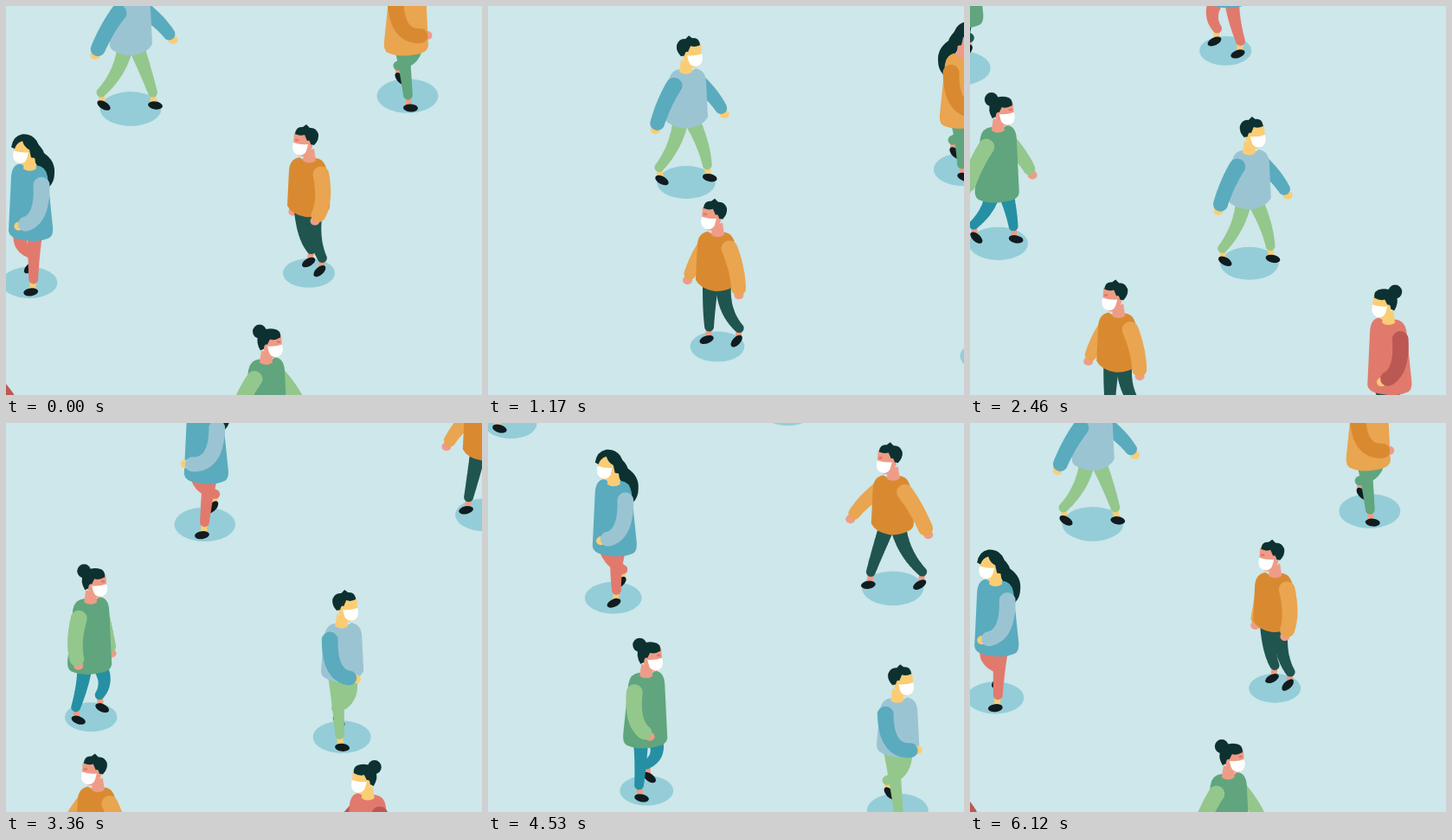
An HTML page with a canvas for the animation above (6.15 s loop, 550x450 px).

```html
<!DOCTYPE html>
<html lang="en">
<head>
<meta charset="utf-8">
<title>Walking people</title>
<style>
html, body { margin: 0; width: 100%; height: 100%; overflow: hidden; background: #cde7ea; }
canvas { display: block; }
</style>
</head>
<body>
<canvas id="stage" width="550" height="450"></canvas>
<script>
const ctx = document.getElementById('stage').getContext('2d');
const LOOP = 6150, STRIDE = 1290, TRAVEL = 447, TICK = 30;
const HAIR = '#0d3130', SHOE = '#101c20', SHADOW = '#94cdd8', MASK = '#ffffff';
const YELLOW = '#facd75', PINK = '#ee9c87';
const SKY = '#9bc4d3', TEAL = '#5aabbe', LEAF = '#94c78c', FERN = '#60a57d';
const OCHRE = '#d98a30', AMBER = '#e9a54f', CORAL = '#e17a6d', BRICK = '#bb5854';
const PINE = '#20544f', OCEAN = '#2590a3';

// dir: 1 walks right, -1 walks left; wide: part of the stride with the legs apart
const people = [
  { x: 167, y: -107, dir: -1, wide: .4, hair: 'bun', skin: PINK, top: FERN, sleeve: LEAF, legs: PINE },
  { x: 464, y: 104, dir: 1, wide: .49, hair: 'long', skin: PINK, top: AMBER, sleeve: OCHRE, legs: FERN },
  { x: 144, y: 119, dir: 1, wide: 0, hair: 'short', skin: YELLOW, top: SKY, sleeve: TEAL, legs: LEAF },
  { x: 27, y: 320, dir: -1, wide: .365, hair: 'long', skin: YELLOW, top: TEAL, sleeve: SKY, legs: CORAL },
  { x: 350, y: 309, dir: -1, wide: .74, hair: 'short', skin: PINK, top: OCHRE, sleeve: AMBER, legs: PINE },
  { x: 662, y: 320, dir: -1, wide: .57, hair: 'bun', skin: YELLOW, top: CORAL, sleeve: BRICK, legs: PINE },
  { x: 301, y: 543, dir: 1, wide: .06, hair: 'bun', skin: PINK, top: FERN, sleeve: LEAF, legs: OCEAN },
  { x: -41, y: 540, dir: 1, wide: 0, hair: 'short', skin: PINK, top: CORAL, sleeve: BRICK, legs: PINE }
];

function shape(d, color) {
  ctx.fillStyle = color;
  ctx.fill(new Path2D(d));
}

function oval(x, y, rx, ry, color, turn = 0) {
  ctx.fillStyle = color;
  ctx.beginPath();
  ctx.ellipse(x, y, rx, ry, turn, 0, 7);
  ctx.fill();
}

// Tapered limb along a quadratic curve
function limb(a, b, c, w0, w1, color) {
  ctx.fillStyle = color;
  ctx.beginPath();
  for (let i = 0; i <= 32; i++) {
    const u = i / 32, v = 1 - u;
    const x = v * v * a[0] + 2 * u * v * b[0] + u * u * c[0];
    const y = v * v * a[1] + 2 * u * v * b[1] + u * u * c[1];
    const r = (w0 * v + w1 * u) / 2;
    ctx.moveTo(x + r, y);
    ctx.arc(x, y, r, 0, 7);
  }
  ctx.fill();
}

function leg(hip, knee, foot, turn, p) {
  const cuff = [foot[0] - 3, foot[1] - 15];
  limb(cuff, cuff, [foot[0] - 2, foot[1] - 4], 7, 7, p.skin);
  oval(foot[0], foot[1], 8.5, 4.5, SHOE, turn);
  limb(hip, knee, cuff, 18, 11, p.legs);
}

function arm(shoulder, elbow, hand, w0, w1, p) {
  const dx = hand[0] - elbow[0], dy = hand[1] - elbow[1], n = Math.hypot(dx, dy) || 1;
  const cuff = [hand[0] - dx / n * 8, hand[1] - dy / n * 8];
  oval(hand[0], hand[1], 5.5, 5, p.skin);
  limb(shoulder, elbow, cuff, w0, w1, p.sleeve);
}

function head(p) {
  shape('M-6-142L6-138 7-128Q0-123-8-128Z', p.skin);
  shape('M-4-160L17-160 18-146Q17-134 9-133Q0-133-4-144Z', p.skin);
  if (p.skin === PINK) oval(14, -152, 2.5, 1.5, '#e4786c');
  if (p.hair === 'short') {
    shape('M-6-146Q-12-152-11-159Q-8-167-1-166L3-170 7-167Q15-168 16-159Q10-156 5-158L2-151Q-1-153-2-147Z', HAIR);
  } else if (p.hair === 'bun') {
    oval(-8, -164, 8, 8, HAIR);
    shape('M-7-142Q-13-152-9-160Q-3-169 8-167Q17-166 16-157Q9-153 4-155L1-149Q-3-150-3-144Z', HAIR);
  } else {
    shape('M-8-140Q-14-153-8-161Q-2-169 8-168Q19-166 21-153L17-151Q15-158 8-160Q6-153 0-150L-2-141Z', HAIR);
  }
  shape('M1-147Q9-146 18-149Q21-139 14-135Q4-132 2-143Z', MASK);
}

function drawPerson(p, life) {
  const angle = (life / STRIDE - p.wide) * 2 * Math.PI;
  const c = Math.cos(angle), s = Math.sin(angle), lift = Math.max(0, s);
  const woman = p.hair !== 'short', k = woman ? .88 : 1;
  const shift = life / LOOP * TRAVEL;

  ctx.save();
  ctx.translate(p.x + shift * p.dir, p.y + shift);
  ctx.scale(p.dir, 1);

  const rx = 30 + 5.5 * c * c;
  oval(0, 0, rx, rx * .56, SHADOW);

  const bob = 3 * c * c - 2, hipY = (woman ? -60 : -69) + bob;
  const near = [(-13.5 - 17.5 * c) * k, 5 - 9 * c - 8 * lift];
  const far = [(6.5 + 19 * c - 5 * s + 3 * c * c) * k, -12 + 8 * c];
  const swing = woman ? 22 : 29;
  const farHand = [20 + swing * c, -70 - 11 * c + bob];
  const nearHand = [-9 - 32 * c, -58 - 9 * c * c + 4 * c + bob];

  arm([11, -119 + bob], [14 + swing * .7 * c, -102 + bob], farHand, 19, 14, p);
  leg([8, hipY], [14 + 4 * c - 7 * s, -42], far, .5 - .35 * c, p);
  leg([-7, hipY], [(near[0] - 10) / 2 + 3.5 + 4 * c + 4 * lift, -40], near, .3 + .25 * c + .45 * lift, p);

  ctx.translate(0, bob);
  if (p.hair === 'long') {
    shape('M-5-164Q-15-156-17-149Q-30-140-29-126Q-29-116-23-110Q-22-119-15-126Q-7-136-3-146Z', HAIR);
  }
  shape(woman
    ? 'M-8-135Q0-129 10-137Q20-136 21-122L24-59Q23-51 10-49Q-10-45-23-51Q-28-54-27-64L-21-122Q-19-134-8-135Z'
    : 'M-8-131Q1-125 11-132Q22-130 23-117L25-76Q20-66 4-63Q-10-62-21-69Q-25-72-24-80L-21-114Q-19-130-8-131Z', p.top);
  ctx.save();
  if (woman) ctx.translate(0, -3);
  head(p);
  ctx.restore();
  ctx.translate(0, -bob);

  arm([-14, -112 + bob], [-20 - 7 * c, -82 - 13 * c + bob], nearHand, 19, 17, p);
  ctx.restore();
}

function render(now) {
  const t = Math.floor(now % LOOP / TICK) * TICK;
  ctx.fillStyle = '#cde7ea';
  ctx.fillRect(0, 0, 550, 450);
  for (const p of people) {
    for (let lap = -1; lap <= 1; lap++) drawPerson(p, t + lap * LOOP);
  }
}

const start = performance.now();
function loop() {
  render(performance.now() - start);
  requestAnimationFrame(loop);
}
loop();
</script>
</body>
</html>
```
